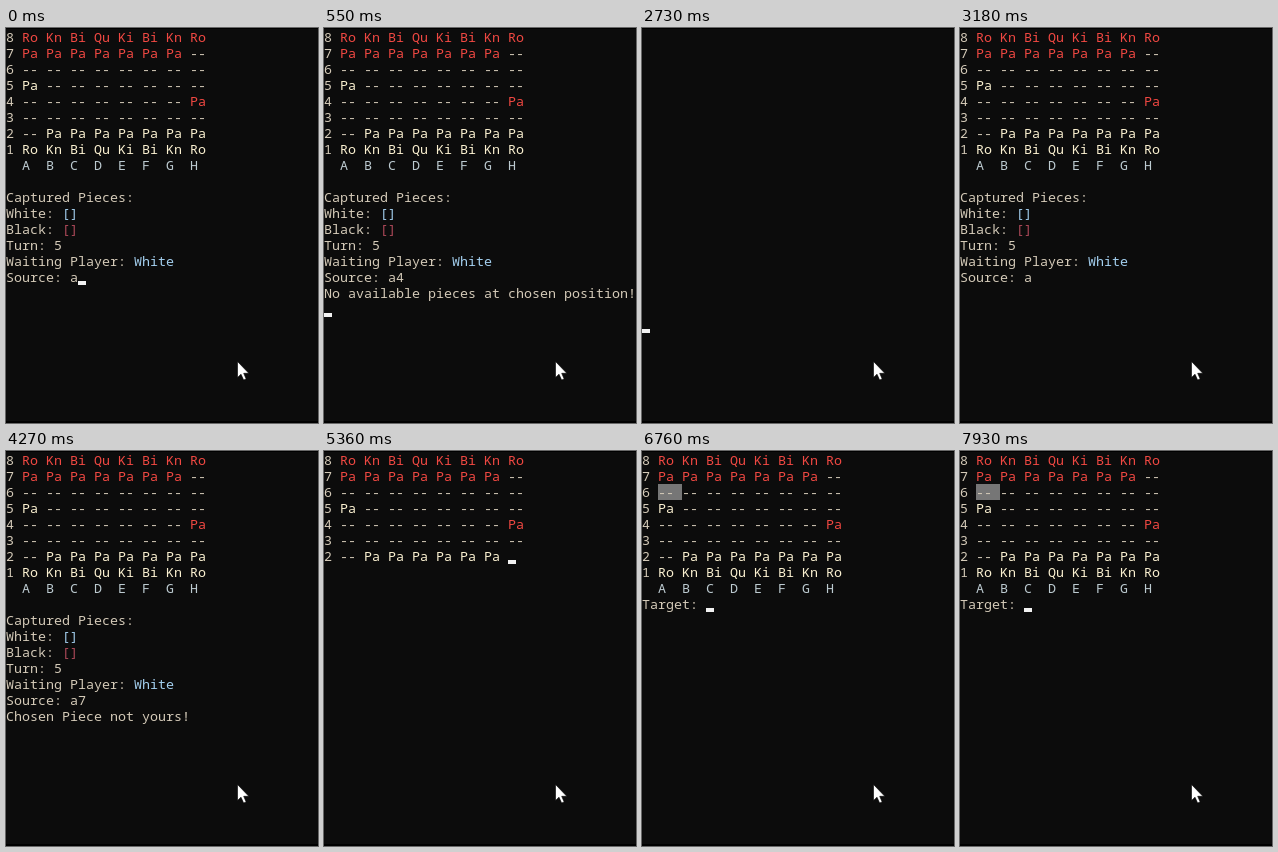
Recreate the animation shown at these times as an HTML page. Size 312 by 395 pixels, loop 8 s.

```html
<!DOCTYPE html>
<html lang="en">
<head>
<meta charset="utf-8">
<title>Console chess</title>
<style>
  html, body { margin: 0; width: 100%; height: 100%; overflow: hidden; background: #0c0c0c; }
  #stage { position: relative; width: 312px; height: 395px; overflow: hidden; background: #0c0c0c; }
  #stage::before, #stage::after { content: ""; position: absolute; left: 0; width: 100%; background: #000; }
  #stage::before { top: 0; height: 1px; }
  #stage::after { bottom: 0; height: 2px; }
  pre {
    position: absolute; left: 0; top: 1px; margin: 0;
    font: 13.3333px/16px "Noto Sans Mono", "DejaVu Sans Mono", monospace;
    font-variant-ligatures: none;
    color: #d4cab8;
  }
  .red { color: #f04842; }
  .white { color: #faf0d0; }
  .files { color: #bccad0; }
  .blue { color: #a4d0f0; }
  .rose { color: #b04a5a; }
  #mark { position: absolute; left: 16px; top: 33px; width: 24px; height: 16px; background: #767676; }
  #caret { position: absolute; width: 8px; height: 4px; background: #f2f2f2; }
  svg { position: absolute; left: 0; top: 0; }
</style>
</head>
<body>
<div id="stage">
  <div id="mark"></div>
  <pre id="screen"></pre>
  <div id="caret"></div>
  <svg width="312" height="395">
    <path d="M231.5 333.5V349.5L235 346.2L237.6 352L240.2 351L237.7 345.3H242.8Z" fill="#fff" stroke="#000" stroke-width=".6"/>
  </svg>
</div>
<script>
const LOOP = 8000;
const [screen, caret, mark] = ["screen", "caret", "mark"].map(id => document.getElementById(id));

const paint = (cls, text) => `<span class="${cls}">${text}</span>`;
const dashes = n => "-- ".repeat(n);
const pawns = n => "Pa ".repeat(n);
const officers = "Ro Kn Bi Qu Ki Bi Kn Ro";

const topRanks = [
  "8 " + paint("red", officers),
  "7 " + paint("red", pawns(7)) + "--",
  "6 " + dashes(8),
  "5 " + paint("white", pawns(1)) + dashes(7),
  "4 " + dashes(7) + paint("red", "Pa"),
  "3 " + dashes(8)
];
const pawnRank = n => "2 -- " + paint("white", pawns(n));
const board = [
  ...topRanks,
  pawnRank(7),
  "1 " + paint("white", officers),
  paint("files", "  A  B  C  D  E  F  G  H")
];
const prompt = (input, message = "") => [
  ...board, "",
  "Captured Pieces:",
  "White: " + paint("blue", "[]"),
  "Black: " + paint("rose", "[]"),
  "Turn: 5",
  "Waiting Player: " + paint("blue", "White"),
  "Source: " + input,
  message
];

const empty = prompt("a4", "No available pieces at chosen position!");
const foreign = prompt("a7", "Chosen Piece not yours!");
const target = [...board, "Target: "];

// Start time, lines, caret column and row (no caret when omitted), square highlight
const steps = [
  [0, prompt("a"), 9, 15],
  [120, prompt("a4"), 10, 15],
  [550, empty, 0, 17],
  [1180, empty],
  [1640, empty, 0, 17],
  [2190, empty],
  [2730, [], 0, 18],
  [2800, prompt("a"), 9, 15],
  [3180, prompt("a")],
  [3270, prompt("a7"), 10, 15],
  [3720, foreign, 0, 17],
  [4270, foreign],
  [4830, foreign, 0, 17],
  [5280, foreign, 0, 18],
  [5360, [...topRanks, pawnRank(6)], 23, 6],
  [5430, prompt(""), 8, 15],
  [5900, prompt("a"), 9, 15],
  [6300, prompt("a")],
  [6380, prompt("a5"), 10, 15],
  [6610, prompt("a5"), 0, 16],
  [6680, [], 0, 16],
  [6760, target, 8, 9, true],
  [7460, target, undefined, undefined, true],
  [7930, target, 8, 9, true]
];

let shown;
function show(step) {
  if (step === shown) return;
  shown = step;
  const [, lines, col, row, marked] = step;
  screen.innerHTML = lines.join("\n");
  mark.hidden = !marked;
  caret.hidden = col === undefined;
  if (!caret.hidden) {
    caret.style.left = col * 8 + "px";
    caret.style.top = 13 + row * 16 + "px";
  }
}

const start = performance.now();
function tick() {
  const time = (performance.now() - start) % LOOP;
  show(steps.findLast(([from]) => from <= time));
  requestAnimationFrame(tick);
}
tick();
</script>
</body>
</html>
```
